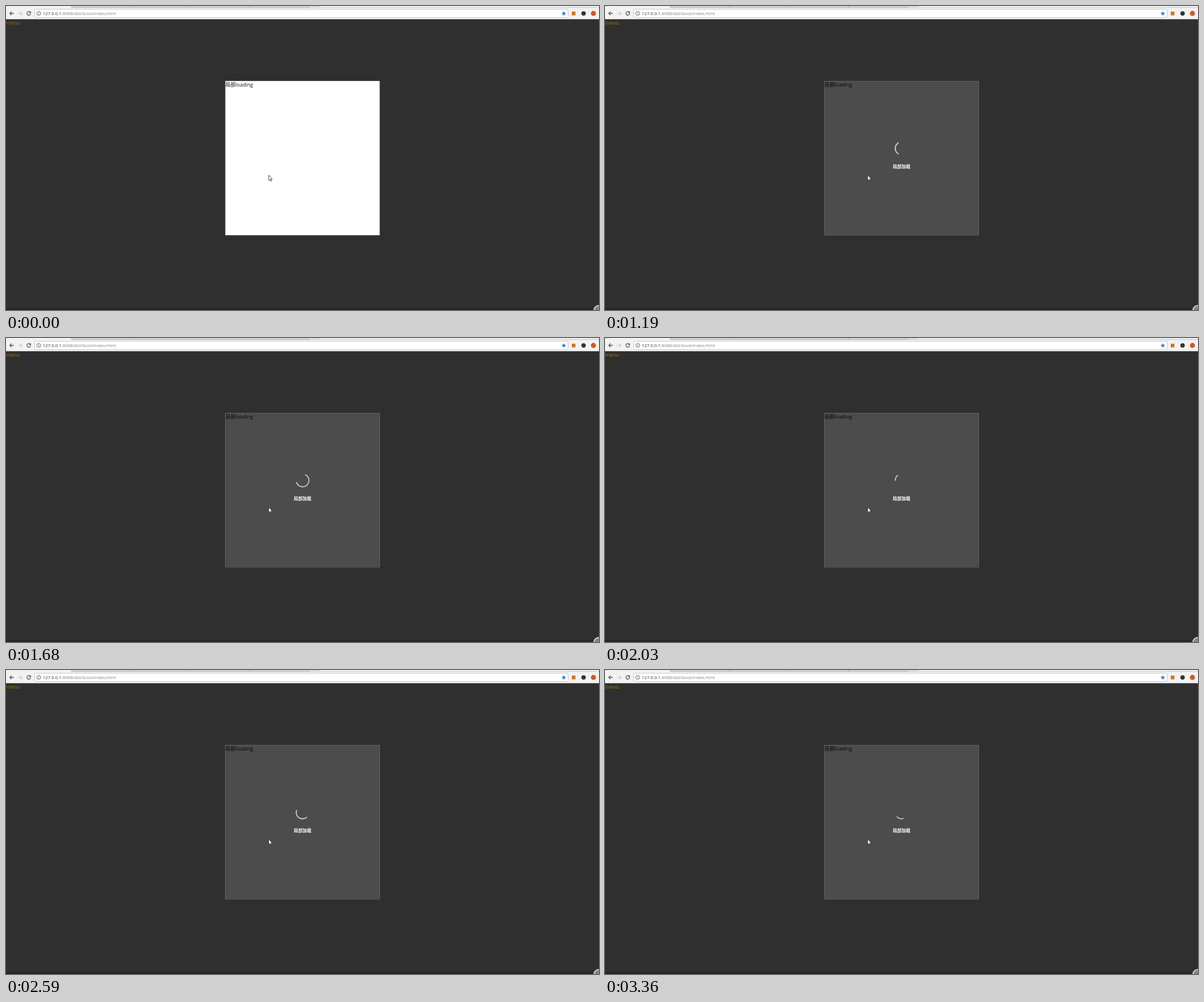
Write an HTML page that moves like this. It is 1045 px wide and 536 px high and loops after 3.43 s.

```html
<!DOCTYPE html>
<html lang="zh">
<head>
<meta charset="utf-8">
<title>Loading panel</title>
<style>
  html, body { margin: 0; width: 100%; height: 100%; overflow: hidden; background: #2f2f2f; }
  svg { display: block; width: 1045px; height: 536px; }
  text { font: 9px "Open Sans", "Noto Sans CJK SC", "Noto Sans CJK", sans-serif; }
  .icon { fill: none; stroke: #555; stroke-width: 1.3; }
  .menu { fill: #946d14; }
  .overlay { visibility: hidden; }
  .loading .menu { fill: #937c14; }
  .loading .overlay { visibility: visible; }
  .label { font-size: 7.8px; font-weight: 700; fill: #fff; text-anchor: middle; }

  /* Paused animations, sought through a negative delay */
  .spin, .dash { animation-play-state: paused; animation-delay: calc(var(--time, 0) * -1s); }
  .spin { animation: rotate 2s linear calc(var(--time, 0) * -1s) infinite paused; }
  .dash {
    fill: none; stroke: #fff; stroke-width: 2.2; stroke-linecap: round;
    animation: dash 1.5s ease-in-out calc(var(--time, 0) * -1s) infinite paused;
  }
  @keyframes rotate { to { transform: rotate(360deg); } }
  @keyframes dash {
    0% { stroke-dasharray: 1px, 200px; stroke-dashoffset: 0; }
    50% { stroke-dasharray: 90px, 150px; stroke-dashoffset: -40px; }
    100% { stroke-dasharray: 90px, 150px; stroke-dashoffset: -120px; }
  }
</style>
</head>
<body>
<svg id="stage" viewBox="0 0 1045 536">
  <rect width="1045" height="536" fill="#2f2f2f"/>

  <!-- Browser bar -->
  <rect width="1045" height="23.3" fill="#f2f2f2"/>
  <rect x="115" width="420" height="2.5" fill="#d3d3d3"/>
  <path d="M114 0l1.5 2.7H534.500l1-2.700M115 2.700H1045" fill="none" stroke="#b4b4b4" stroke-width=".7"/>
  <path d="M219.500 0v2.500M324.500 0v2.500M429.500 0v2.500" stroke="#999" stroke-width=".8"/>
  <path d="M537.500 .3h14" stroke="#aaa" stroke-width=".8"/>
  <path d="M2 0h2" stroke="#888"/>
  <rect x="50.500" y="5.800" width="940" height="14.400" rx="1.500" fill="#fff" stroke="#bbb" stroke-width=".8"/>
  <path id="arrow" class="icon" d="M13.800 13H6.800M10 9.600L6.600 13l3.400 3.400"/>
  <path class="icon" style="stroke:#cdcdcd" d="M21.200 13h7M25 9.600l3.400 3.400L25 16.400"/>
  <path class="icon" d="M42.700 10.700A3.300 3.300 0 1 0 43.400 14"/>
  <path d="M44 9v3.800h-3.800z" fill="#555"/>
  <circle class="icon" cx="57.700" cy="13" r="3.500" style="stroke-width:.9"/>
  <path d="M57.700 12.500v2.500M57.700 10.800v1" stroke="#555" stroke-width=".9"/>
  <text x="64.800" y="15.800" style="font-size:7.83px" fill="#808080"><tspan fill="#333">127.0.0.1</tspan>:8088/dst/boot/index.html</text>
  <path d="M983 8.900l1.200 2.800 3 .2-2.300 2 .7 3-2.600-1.600-2.600 1.600.7-3-2.300-2 3-.2z" fill="#3f7fc9"/>
  <rect x="997" y="10" width="6.500" height="6.500" fill="#c7772d"/>
  <circle cx="1017.800" cy="13.100" r="3.900" fill="#333"/>
  <circle cx="1035.200" cy="13.100" r="4.500" fill="#c85c27"/>

  <!-- Page -->
  <text class="menu" x="0" y="33">menu</text>
  <rect y="533" width="1045" height="3" fill="#2a2324"/>
  <circle cx="1044.500" cy="536.500" r="8.500" fill="#7c8a86" stroke="#e8ecea" stroke-width="1.500"/>
  <rect x="386.500" y="132.200" width="272" height="272" fill="#fff"/>
  <text x="386.500" y="141.800" fill="#111">局部loading</text>

  <g class="overlay">
    <rect x="386.500" y="132.200" width="272" height="272" fill="#000" fill-opacity=".7"/>
    <g transform="translate(522.600 251.100) scale(.56)">
      <g class="spin"><circle class="dash" r="20"/></g>
    </g>
    <text class="label" x="522.500" y="286.400">局部加载</text>
  </g>

  <path d="M463 298.200v9.600l2.200-2 1.500 3 1.300-.6-1.400-3h2.600z" fill="#fff" stroke="#222" stroke-width=".8"/>
</svg>
<script>
  const LOOP = 3430, LOAD_AT = 910, STEP = 70;
  const FIRST_POSE = 0.05, POSE_STEP = 0.0774; // spinner seconds
  const stage = document.getElementById("stage");
  const start = performance.now();

  function draw() {
    const elapsed = (performance.now() - start) % LOOP;
    const step = Math.floor((elapsed - LOAD_AT) / STEP);
    stage.classList.toggle("loading", step >= 0);
    stage.style.setProperty("--time", FIRST_POSE + Math.max(step, 0) * POSE_STEP);
    requestAnimationFrame(draw);
  }
  draw();
</script>
</body>
</html>
```
